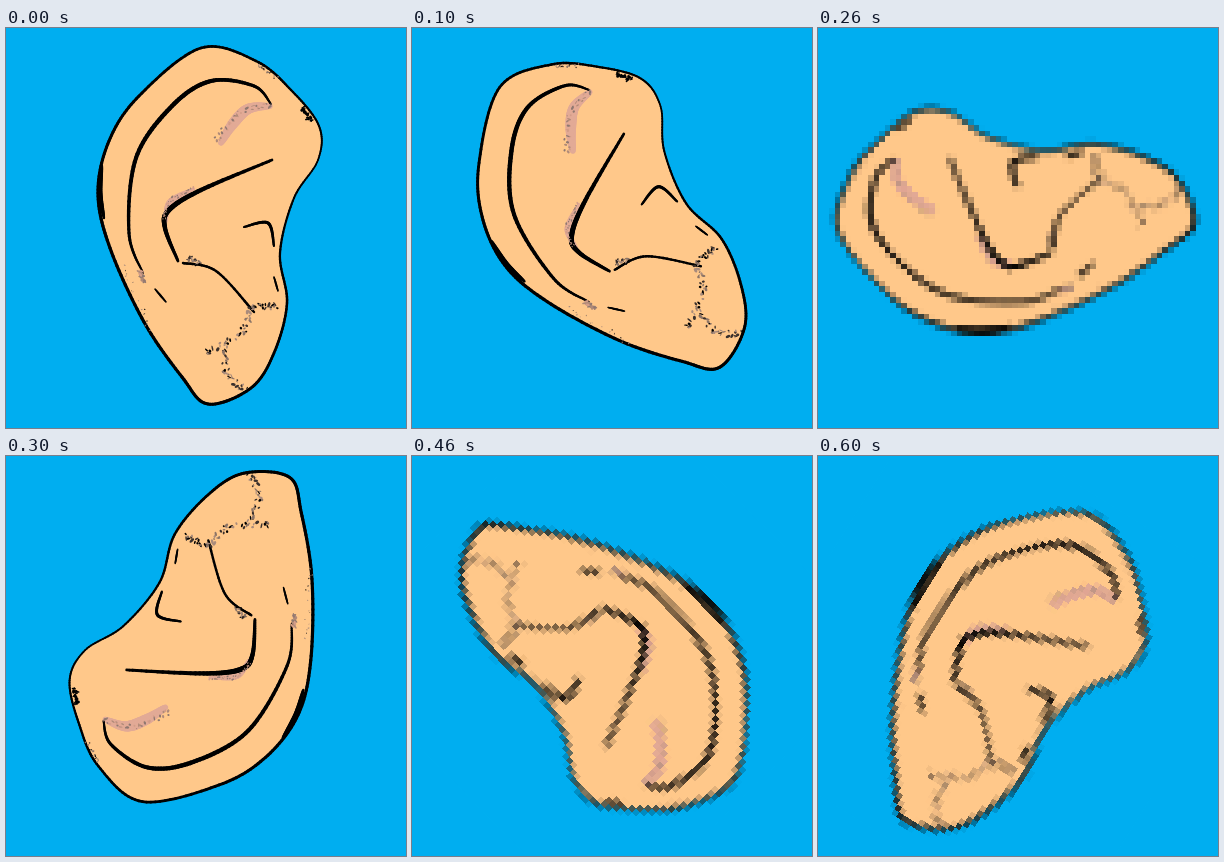
Recreate the animation shown at these times as an HTML page with a canvas. Size 400 by 400 pixels, loop 0.7 s.

```html
<!DOCTYPE html>
<html lang="en">
<head>
<meta charset="utf-8">
<title>Turning ear</title>
<style>
html, body { margin: 0; width: 100%; height: 100%; overflow: hidden; background: #00aef0; }
canvas { display: block; }
</style>
</head>
<body>
<canvas id="stage" width="400" height="400"></canvas>
<script>
const BLUE = '#00aef0', SKIN = '#ffc88a', PINK = '#e2aa96', INK = '#000';
const MIXED = [INK, '#3a302c', '#8c7466', '#a98b7b'], SOFT = ['#b08a78', '#8f7870', '#d39d88'];
const CELLS = 72; // resolution of the coarse poses

// Rotation in degrees, x shift, y shift
const POSES = [
  [0, 0, 0], [-37, 0, 0], [-90, 0, -3], [-154.5, 9.5, -19],
  [135.5, -6, -5], [67.5, -26, -33], [32, -23, 13]
];

// Samples a Catmull-Rom spline through the points
function curve(text, closed) {
  const p = text.split(' ').map(s => s.split(',').map(Number)), n = p.length, out = [];
  const at = i => closed ? p[(i + n) % n] : p[Math.max(0, Math.min(n - 1, i))];
  for (let i = 0; i < (closed ? n : n - 1); i++) {
    const [a, b, c, d] = [at(i - 1), at(i), at(i + 1), at(i + 2)];
    for (let t = 0; t < 1; t += 1 / 16)
      out.push([0, 1].map(k => b[k] + t / 2 * (c[k] - a[k] +
        t * (2 * a[k] - 5 * b[k] + 4 * c[k] - d[k] + t * (3 * (b[k] - c[k]) + d[k] - a[k])))));
  }
  out.push(closed ? p[0] : p[n - 1]);
  return out;
}

const outline = curve('312,132 288,170 274,225 281,275 268,325 245,360 202,376 176,349 138,294 104,220 92,165 103,113 133,68 195,20 250,33 285,62 313,98', true);

function trace(c, pts) {
  c.beginPath();
  pts.forEach(p => c.lineTo(...p));
}

// Line that swells from thin ends to a thick middle
function brush(c, pts, thin, thick, color = INK) {
  c.strokeStyle = color;
  for (let i = 1; i < pts.length; i++) {
    c.lineWidth = thin + (thick - thin) * Math.sin(Math.PI * i / pts.length);
    trace(c, pts.slice(i - 1, i + 1));
    c.stroke();
  }
}

function randomizer(seed) {
  return () => (seed = seed * 16807 % 2147483647) / 2147483647;
}

// Broken grains scattered along a curve
function grains(c, text, size, spread, colors, rnd) {
  for (const [x, y] of curve(text)) {
    const jitter = () => (rnd() - 0.5) * spread;
    c.fillStyle = colors[Math.floor(rnd() * colors.length)];
    c.beginPath();
    c.ellipse(x + jitter(), y + jitter(), size * (0.4 + rnd()), size * (0.3 + 0.5 * rnd()), rnd() * 3, 0, 7);
    c.fill();
  }
}

const FOLDS = [
  ['265,76 248,58 205,53 166,78 130,130 123,205 137,245', 1.8, 4.4], // helix
  ['266,132 195,162 163,182 159,200 172,233', 2.6, 5],               // antihelix
  ['177,235 210,243 248,284', 2.4, 2.4],
  ['238,199 262,195 268,218', 2, 3],                                 // tragus
  ['268,249 272,263', 1.2, 2],
  ['149,261 160,274', 1.2, 2],
  ['96,138 94,165 98,190', 2, 5]                                     // heavy rim
];

const MARKS = [
  ['210,112 232,86 264,77', 1.6, 5, SOFT],
  ['158,190 164,173 187,161', 1.2, 3, SOFT],
  ['134,245 139,254', 2.2, 4, SOFT],
  ['182,229 193,235', 1.6, 6, MIXED],
  ['270,279 247,280 236,304 200,325', 2.1, 6, MIXED],
  ['218,318 221,345 238,361', 1.8, 7, MIXED],
  ['296,79 305,93', 2, 4, [INK]],
  ['254,37 271,50', 1.1, 4, MIXED],
  ['117,240 143,301', 0.9, 6, MIXED]
];

// weight scales the line widths
function ear(c, weight) {
  const rnd = randomizer(4711);
  const line = (pts, thin, thick, color) => brush(c, pts, thin * weight, thick * weight, color);
  c.lineCap = c.lineJoin = 'round';
  trace(c, outline);
  c.fillStyle = SKIN;
  c.fill();
  line(outline, 1.7, 3.2);
  line(curve('215,115 226,97 242,81 264,78'), 5, 11, PINK);
  line(curve('160,194 164,174 188,161'), 2, 6, PINK);
  for (const [text, thin, thick] of FOLDS) line(curve(text), thin, thick);
  for (const mark of MARKS) grains(c, ...mark, rnd);
}

const coarse = document.createElement('canvas');
coarse.width = coarse.height = CELLS;
const small = coarse.getContext('2d');
small.fillStyle = BLUE;
small.fillRect(0, 0, CELLS, CELLS);
small.scale(CELLS / 400, CELLS / 400);
ear(small, 0.8);

const ctx = document.getElementById('stage').getContext('2d');

function draw() {
  const step = Math.floor(performance.now() % 700 / 100);
  const [angle, dx, dy] = POSES[step];
  ctx.resetTransform();
  ctx.fillStyle = BLUE;
  ctx.fillRect(0, 0, 400, 400);
  ctx.translate(200 + dx, 200 + dy);
  ctx.rotate(angle * Math.PI / 180);
  ctx.translate(-200, -200);
  ctx.imageSmoothingEnabled = false;
  // Every second pose after the first is coarse
  if (step && step % 2 === 0) ctx.drawImage(coarse, 0, 0, 400, 400);
  else ear(ctx, 1);
  requestAnimationFrame(draw);
}
draw();
</script>
</body>
</html>
```
